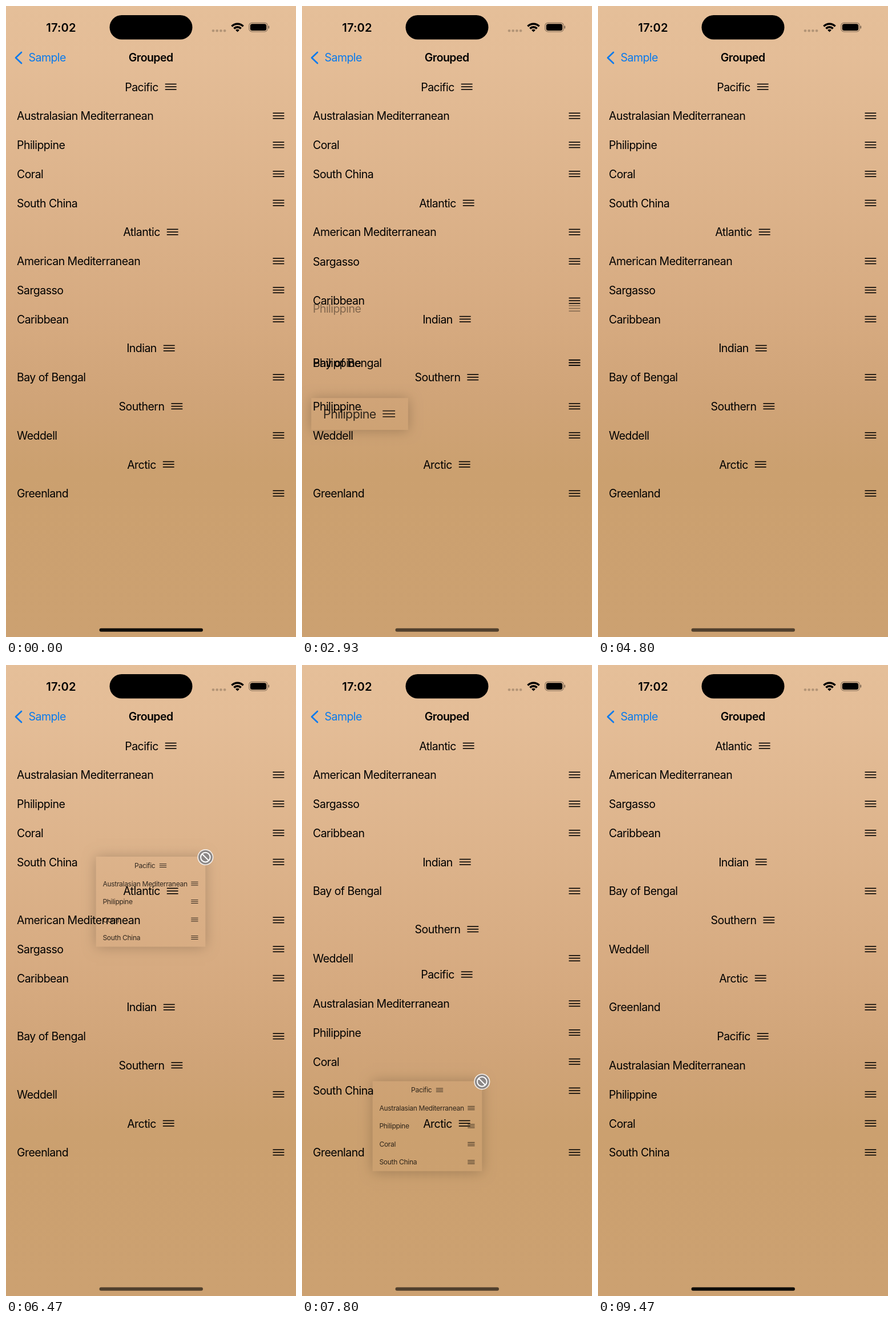
An HTML page with a canvas for the animation above (9.53 s loop, 508 by 1103 pixels).

```html
<!DOCTYPE html>
<html lang="en">
<head>
<meta charset="utf-8">
<title>Grouped list</title>
<style>
  html, body { margin: 0; width: 100%; height: 100%; overflow: hidden; background: #cca171; }
  canvas { display: block; }
</style>
</head>
<body>
<canvas id="stage" width="508" height="1103"></canvas>
<script>
const W = 508, H = 1103, LOOP = 9530, ROW = 50.77, TOP = 141.5, MARGIN = 19;
const ctx = document.getElementById('stage').getContext('2d');

// Upper-case keys are section headers, lower-case keys are rows.
const LABELS = {
  P: 'Pacific', a: 'Australasian Mediterranean', p: 'Philippine', c: 'Coral', s: 'South China',
  A: 'Atlantic', m: 'American Mediterranean', g: 'Sargasso', b: 'Caribbean',
  I: 'Indian', y: 'Bay of Bengal', S: 'Southern', w: 'Weddell', R: 'Arctic', l: 'Greenland'
};
const START = 'PapcsAmgbIySwRl';
const isHeader = id => id < 'a';

const clamp = v => Math.max(0, Math.min(1, v));
const mix = (a, b, p) => a + (b - a) * p;
const easeOut = p => 1 - (1 - clamp(p)) ** 3;
const ramp = (t, from, to) => easeOut((t - from) / (to - from));

// Order changes made by the two drags: one row, then a whole section.
const moveRow = k => { const rest = [...START.replace('p', '')]; rest.splice(k, 0, 'p'); return rest.join(''); };
const moveSection = k => { const rest = ['Amgb', 'Iy', 'Sw', 'Rl']; rest.splice(k, 0, 'Papcs'); return rest.join(''); };
const rowMoves = [[2430, 3], [2490, 4], [2535, 5], [2575, 6], [2620, 7], [2817, 8], [2835, 9], [2848, 10], [2925, 11], [3050, 12]];
for (let k = 11; k >= 2; k--) rowMoves.push([3430 + (11 - k) * 65, k]);
const sectionMoves = [[6850, 1], [7220, 2], [7560, 3], [8050, 4]];

const sectionOf = order => order.slice(0, order.indexOf('p')).replace(/[a-z]/g, '').slice(-1);
const events = [
  ...rowMoves.map(([at, k]) => ({ at, order: moveRow(k), single: true })),
  ...sectionMoves.map(([at, k]) => ({ at, order: moveSection(k) }))
];
events.forEach((e, i) => e.crosses = e.single && sectionOf(e.order) !== sectionOf(i ? events[i - 1].order : START));

const slot = (order, id) => TOP + ROW * order.indexOf(id);

function rowY(id, t, count = events.length) {
  let goal = slot(START, id), y = goal;
  for (const e of events.slice(0, count)) {
    if (t < e.at) break;
    const next = slot(e.order, id);
    if (next === goal) continue;
    goal = next;
    const snaps = e.single && (isHeader(id) || (id === 'p' && e.crosses));
    y = mix(y, goal, snaps ? 1 : ramp(t, e.at, e.at + 400));
  }
  return y;
}

const background = ctx.createLinearGradient(0, 0, 0, H);
[[0, '#e5bf99'], [.08, '#e4bd97'], [.5, '#d6aa80'], [.62, '#d0a478'], [.74, '#cba06f'], [1, '#cca171']]
  .forEach(stop => background.addColorStop(...stop));

function font(weight = 400, size = 19.5, spacing = -.54) {
  ctx.font = `${weight} ${size}px Inter, sans-serif`;
  ctx.letterSpacing = spacing + 'px';
}

function pill(x, y, w, h, r, style) {
  ctx.fillStyle = style;
  ctx.beginPath();
  ctx.roundRect(x, y, w, h, r);
  ctx.fill();
}

function drawRow(id, y, width = W) {
  font();
  ctx.fillStyle = '#000';
  const w = ctx.measureText(LABELS[id]).width;
  const x = isHeader(id) ? (width - w - 33) / 2 : MARGIN;
  const handle = isHeader(id) ? x + w + 12 : width - MARGIN - 21.5;
  ctx.fillText(LABELS[id], x, y + 7);
  for (const dy of [-4.7, 0, 4.7]) ctx.fillRect(handle, y + dy - 1.1, 19.8, 1.6);
}

function drawChrome(t) {
  font(600, 20.2, .1);
  ctx.fillStyle = '#000';
  ctx.textAlign = 'center';
  ctx.fillText('17:02', 96.5, 45);
  font(600);
  ctx.fillText('Grouped', 253.7, 97);
  ctx.textAlign = 'left';
  font();
  ctx.fillStyle = '#077aee';
  ctx.fillText('Sample', 39.5, 97);
  ctx.strokeStyle = '#077aee';
  ctx.lineWidth = 2.7;
  ctx.lineCap = ctx.lineJoin = 'round';
  ctx.stroke(new Path2D('M27 81 L17 90.5 L27 100'));

  pill(181.5, 16, 145, 42.5, 21.25, '#000');
  for (let i = 0; i < 4; i++) pill(360.7 + i * 6.7, 41, 4.6, 4.6, 2.3, 'rgba(0,0,0,.22)');
  ctx.fillStyle = '#000';
  for (const [inner, outer] of [[0, 4.8], [6.8, 10.4], [12.4, 16]]) {
    ctx.beginPath();
    ctx.arc(405.5, 45.5, outer, -Math.PI * .75, -Math.PI * .25);
    ctx.arc(405.5, 45.5, inner, -Math.PI * .25, -Math.PI * .75, true);
    ctx.fill();
  }
  ctx.strokeStyle = 'rgba(0,0,0,.4)';
  ctx.lineWidth = 1.2;
  ctx.beginPath();
  ctx.roundRect(425.8, 29.3, 32.4, 15.6, 5);
  ctx.stroke();
  pill(427.8, 31.3, 28.4, 11.6, 3.5, '#000');
  pill(459.4, 34.5, 1.8, 5, 1, 'rgba(0,0,0,.45)');

  const dim = drags.reduce((sum, d) => sum + ramp(t, d.morph, d.morph + 250) - ramp(t, d.release, d.release + 250), 0);
  pill(163.5, 1087.8, 181.5, 6, 3, `rgba(0,0,0,${mix(.92, .6, dim)})`);
}

// Each path point is time, x, y of the preview's centre.
const drags = [
  { ids: 'p', lift: 1380, morph: 2080, drop: 4250, release: 4900, scale: 1.1,
    path: [[2080, 254, 243], [2280, 112, 265], [2600, 101, 425], [2800, 101, 565], [2930, 101, 713],
           [3150, 106, 755], [3400, 125, 735], [4050, 165, 258], [4250, 165, 243]] },
  { ids: 'Papcs', lift: 5500, morph: 6130, drop: 8550, release: 9100, scale: .62, badge: true,
    path: [[6130, 254, 243], [6330, 256, 335], [6470, 253.5, 413.5], [7150, 240, 605], [7800, 219.5, 806],
           [8150, 214, 845], [8550, 214, 845]] }
];

function along(path, t) {
  let [, x, y] = path[0];
  path.slice(1).forEach(([end, nx, ny], i) => {
    const p = clamp((t - path[i][0]) / (end - path[i][0]));
    if (p > 0) [x, y] = [mix(path[i][1], nx, p), mix(path[i][2], ny, p)];
  });
  return [x, y];
}

function drawBadge(x, y, alpha) {
  ctx.save();
  ctx.translate(x, y);
  ctx.globalAlpha = alpha;
  pill(-14, -14, 28, 28, 14, '#f4efeb');
  pill(-12.4, -12.4, 24.8, 24.8, 12.4, '#8b8786');
  ctx.strokeStyle = '#fff';
  ctx.lineWidth = 2;
  ctx.beginPath();
  ctx.arc(0, 0, 8.3, 0, 7);
  ctx.moveTo(-5.8, -5.8);
  ctx.lineTo(5.8, 5.8);
  ctx.stroke();
  ctx.restore();
}

function drawPreview(drag, t) {
  const { ids, lift, morph, drop } = drag;
  if (t < lift || t > drop + 350) return;
  const lifted = ramp(t, lift, lift + 320);
  const compact = ramp(t, morph, morph + 220);
  const landing = ramp(t, drop, drop + 350);
  const shown = 1 - landing;

  font();
  const widest = Math.max(...[...ids].map(id => ctx.measureText(LABELS[id]).width));
  const small = widest + 32 + 2 * MARGIN;
  const width = mix(W, small, compact), height = ROW * ids.length;
  const scale = mix(mix(1 + .03 * lifted, drag.scale, compact), 1, landing);
  const middle = (rowY(ids[0], t) + rowY(ids.at(-1), t)) / 2;
  let [x, y] = along(drag.path, t);
  x = mix(x, small / 2, landing);
  y = mix(y, middle, landing);
  const w = width * scale, h = height * scale, left = x - w / 2, top = y - h / 2;

  // The shadow falls outside the card only, so the list shows through it.
  ctx.save();
  ctx.beginPath();
  ctx.rect(-50, -50, W + 100, H + 100);
  ctx.rect(left, top, w, h);
  ctx.clip('evenodd');
  ctx.shadowColor = `rgba(0,0,0,${mix(.48, .22, compact) * lifted * shown})`;
  ctx.shadowBlur = 22;
  ctx.shadowOffsetX = 2 * W;
  ctx.shadowOffsetY = 1;
  ctx.fillStyle = '#000';
  ctx.fillRect(left - 2 * W, top, w, h);
  ctx.restore();

  ctx.save();
  ctx.globalAlpha = 1 - compact;
  ctx.fillStyle = background;
  ctx.fillRect(left, top, w, h);
  ctx.globalAlpha = mix(1, .77, compact) * shown;
  ctx.translate(left, top);
  ctx.scale(scale, scale);
  [...ids].forEach((id, i) => drawRow(id, (i + .5) * ROW, width));
  ctx.restore();
  if (drag.badge) drawBadge(left + w, top + 1, compact * shown);
}

function draw(t) {
  ctx.fillStyle = background;
  ctx.fillRect(0, 0, W, H);
  for (const id of START) drawRow(id, rowY(id, t));
  // A row that changes section leaves a fading copy behind.
  events.forEach((e, i) => {
    const age = (t - e.at) / 160;
    if (!e.crosses || age < 0 || age >= 1) return;
    ctx.globalAlpha = 1 - age;
    drawRow('p', rowY('p', t, i));
    ctx.globalAlpha = 1;
  });
  drags.forEach(d => drawPreview(d, t));
  drawChrome(t);
}

function frame() {
  draw(performance.now() % LOOP);
  requestAnimationFrame(frame);
}
frame();
</script>
</body>
</html>
```
